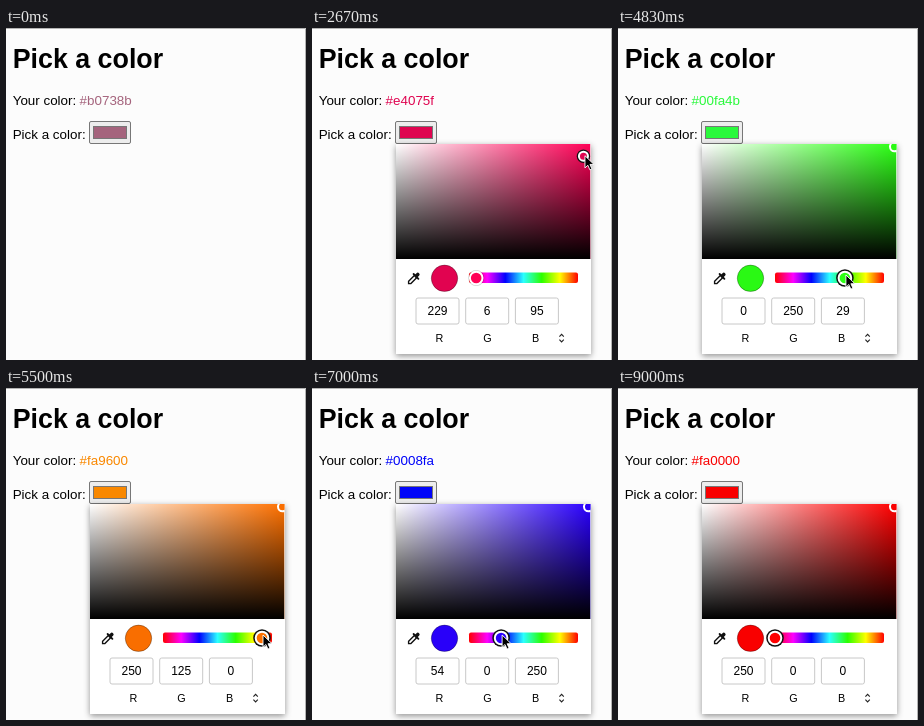
An HTML page that plays this animation: 300x332 px, repeating every 9.17 s.

```html
<!DOCTYPE html>
<html lang="en">
<head>
<meta charset="utf-8">
<title>Pick a color</title>
<style>
  html, body { margin: 0; width: 100%; height: 100%; overflow: hidden; background: #fcfcfc; }
  svg { display: block; width: 300px; height: 332px; font: 13.4px Arial, "Liberation Sans", sans-serif; }
  h1, .title { font-size: 26.8px; font-weight: bold; }
  .panel { fill: #fff; filter: drop-shadow(0 2px 3px rgba(0, 0, 0, .42)); }
  .field { fill: #fff; stroke: #c8c8c8; }
  .value { font-size: 12px; text-anchor: middle; }
  .label { font-size: 10.8px; text-anchor: middle; }
  .ring { fill: none; stroke: #fff; stroke-width: 2; }
  .focus { fill: #111; }
</style>
</head>
<body>
<svg viewBox="0 0 300 332">
  <defs>
    <linearGradient id="white"><stop stop-color="#fff"/><stop offset="1" stop-color="#fff" stop-opacity="0"/></linearGradient>
    <linearGradient id="black" x2="0" y2="1"><stop stop-opacity="0"/><stop offset="1"/></linearGradient>
    <linearGradient id="hues"></linearGradient>
    <clipPath id="well"><path d="M84 116h194.5v115H84z"/></clipPath>
  </defs>

  <rect width="300" height="332" fill="#fcfcfc"/>
  <path d="M0 .5H299.5V332" fill="none" stroke="#b4b4b4"/>
  <text class="title" x="6.7" y="40">Pick a color</text>
  <text x="6.7" y="76.5">Your color:</text>
  <text id="hex" x="73.6" y="76.5"></text>
  <text x="6.7" y="110.5">Pick a color:</text>
  <rect id="button" x="83.5" y="93.5" width="41" height="22" rx="1.5"/>
  <rect id="chip" x="87.5" y="98.5" width="33" height="12" stroke="#777"/>

  <g id="picker">
    <rect class="panel" x="84" y="116" width="195" height="210"/>
    <g clip-path="url(#well)">
      <rect id="tone" x="84" y="116" width="194.5" height="115"/>
      <rect x="84" y="116" width="194.5" height="115" fill="url(#white)"/>
      <rect x="84" y="116" width="194.5" height="115" fill="url(#black)"/>
      <g id="spot">
        <circle class="focus" r="6.7"/>
        <circle class="fill" r="4"/>
        <circle class="ring" r="4.5"/>
      </g>
    </g>

    <g fill="none" stroke="#111" stroke-linecap="round">
      <path d="M96.6 255.6v-2.3l6-6 2.3 2.3-6 6z" stroke-width="1.4"/>
      <path d="M101.6 246l4.8 4.8" stroke-width="1.8"/>
      <path d="M104.2 248l1.6-1.6" stroke-width="3.6"/>
    </g>
    <circle id="swatch" cx="132.5" cy="250.3" r="13.2" stroke="#000" stroke-opacity=".3"/>
    <rect x="157" y="244.5" width="109" height="10.5" rx="2" fill="url(#hues)"/>
    <g id="knob">
      <circle class="focus" r="8.8"/>
      <circle r="8" fill="#000" opacity=".18"/>
      <circle class="fill" r="6"/>
      <circle class="ring" r="6.3"/>
    </g>
    <g id="fields"></g>
    <path d="M247.4 308.7l2.2-2.3 2.2 2.3M247.4 311.7l2.2 2.3 2.2-2.3" fill="none" stroke="#222" stroke-width="1.1"/>
  </g>

  <path id="cursor" d="M0 0V12.2L2.9 9.5 4.9 14.1 7 13.2 5 8.7H9z" fill="#000" stroke="#fff" stroke-width=".9"/>
</svg>

<script>
const LOOP = 9170;
const $ = id => document.getElementById(id);

// Keys are [step, value, ...]; six steps per second.
const hueKeys = [
  [10, 336.393], [15, 336.054], [23.3, 336.054], [28.7, 138], [29, 126.96],
  [31, 70], [33, 30], [35, 4.08], [37, 4.08], [41.7, 238.08], [42, 252.96],
  [45, 335], [48, 360]
];
const toneKeys = [
  [10, 61 / 176, 176 / 255], [15.7, 221 / 228, 228 / 255],
  [16, 223 / 229, 229 / 255], [18, 1, 250 / 255]
];
const cursorKeys = [
  [1, 215, 335], [5, 111, 103], [8, 111, 103], [10, 152, 150],
  [18, 277, 118], [22, 165, 247]
];

function track(keys, at) {
  if (at <= keys[0][0]) return keys[0].slice(1);
  const i = keys.findIndex(k => k[0] >= at);
  if (i < 0) return keys[keys.length - 1].slice(1);
  const a = keys[i - 1], b = keys[i];
  const p = (at - a[0]) / (b[0] - a[0]);
  return a.slice(1).map((v, j) => v + (b[j + 1] - v) * p);
}

function rgb(h, s, v) {
  return [5, 3, 1].map(n => {
    const k = (n + h / 60) % 6;
    return Math.round(255 * v * (1 - s * Math.max(0, Math.min(k, 4 - k, 1))));
  });
}

// Screen rendering of a color: slightly darker mids, warmer greens.
function shade(color) {
  const [r, g, b] = color.map(c => 255 * (c / 255) ** 1.18);
  return `rgb(${[Math.max(r, g * .17), g, b].map(Math.round)})`;
}

const toHex = color => "#" + color.map(c => c.toString(16).padStart(2, "0")).join("");

function colorAt(at) {
  const [h] = track(hueKeys, at), [s, v] = track(toneKeys, at);
  return { h, s, v, color: rgb(h, s, v) };
}

$("hues").innerHTML = [6, 5, 4, 3, 2, 1, 0].map((n, i) =>
  `<stop offset="${i / 6}" stop-color="${shade(rgb(n * 60, 1, 1))}"/>`).join("");
$("fields").innerHTML = ["R", "G", "B"].map((name, i) => `
  <rect class="field" x="${104 + i * 49.7}" y="270" width="43" height="26" rx="2"/>
  <text class="value" x="${125.5 + i * 49.7}" y="287.2"></text>
  <text class="label" x="${127.5 + i * 48}" y="314">${name}</text>`).join("");

const values = document.querySelectorAll(".value");
const move = (el, x, y) => el.setAttribute("transform", `translate(${x} ${y})`);
const show = (el, on) => el.setAttribute("visibility", on ? "inherit" : "hidden");

function drawHandle(el, x, y, focused, fill) {
  move(el, x, y);
  show(el.querySelector(".focus"), focused);
  el.querySelector(".fill").setAttribute("fill", fill);
}

function draw(step) {
  const { h, s, v, color } = colorAt(step);
  const page = colorAt(step - .3).color; // the page trails the picker a little
  const paint = shade(color), pure = shade(rgb(h, 1, 1));
  const spot = [84 + 192.5 * s, 116.5 + 115 * (1 - v)];
  const knobX = 157 + 108 * (1 - h / 360);
  const onHue = step >= 23;
  const hover = step >= 5 && step < 9;

  $("hex").textContent = toHex(page);
  $("hex").setAttribute("fill", shade(page));
  $("chip").setAttribute("fill", shade(page));
  $("button").setAttribute("fill", hover ? "#d4d4d4" : "#ededed");
  $("button").setAttribute("stroke", hover ? "#505050" : "#777");

  show($("picker"), step >= 6);
  $("tone").setAttribute("fill", pure);
  $("swatch").setAttribute("fill", paint);
  drawHandle($("spot"), ...spot, !onHue, paint);
  drawHandle($("knob"), knobX, 250, onHue, pure);
  values.forEach((el, i) => el.textContent = color[i]);

  let [x, y] = track(cursorKeys, step);
  if (step >= 10 && step <= 18) [x, y] = [spot[0] + 1.5, spot[1] - .5];
  if (onHue) [x, y] = [knobX + 1, 247];
  move($("cursor"), x, y);
  show($("cursor"), step >= 1 && step < 51);
}

function frame() {
  const t = performance.now() % LOOP, r = t % 500;
  draw(3 * Math.floor(t / 500) + (r >= 170) + (r >= 330));
  requestAnimationFrame(frame);
}
frame();
</script>
</body>
</html>
```
